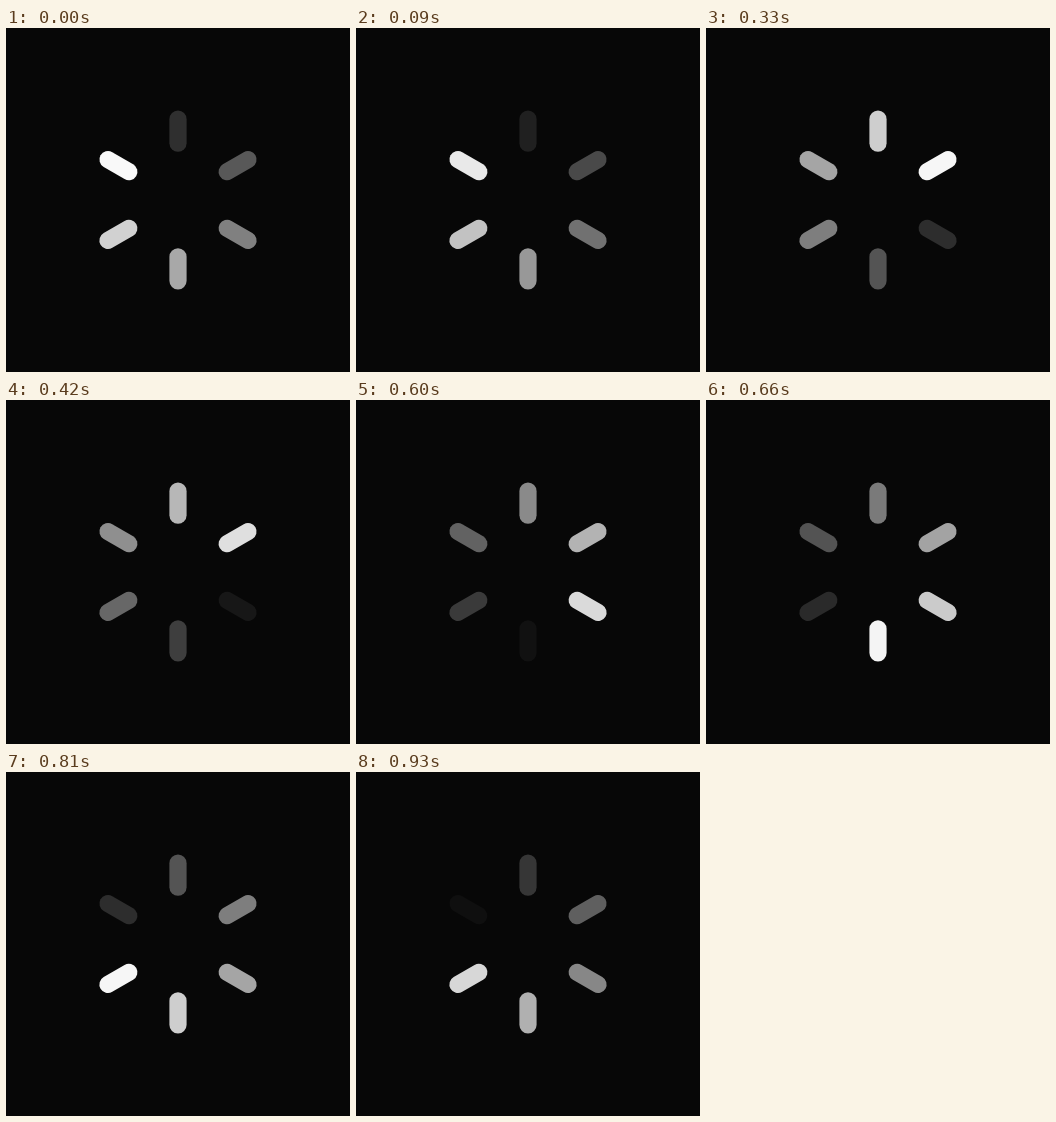
An HTML page that plays this animation: 344 px wide and 344 px high, repeating every 960 ms.

```html
<!DOCTYPE html>
<html lang="en">
<head>
<meta charset="utf-8">
<title>Spinner</title>
<style>
  html, body { margin: 0; width: 100%; height: 100%; overflow: hidden; background: #070707; }
  svg { display: block; width: 100vw; height: 100vh; }
  rect { fill: #f9f9f9; }
</style>
</head>
<body>
<svg id="spinner" viewBox="0 0 100 100"></svg>
<script>
  const LOOP = 960;
  const COUNT = 6;
  // Moments (ms) at which the picture is refreshed; it holds in between.
  const TICKS = [0, 30, 60, 120, 180, 240, 330, 420, 480, 540, 600, 660, 750, 810, 870, 930];

  const spinner = document.getElementById('spinner');
  const bars = Array.from({ length: COUNT }, (_, i) => {
    const bar = document.createElementNS('http://www.w3.org/2000/svg', 'rect');
    const attrs = {
      x: 47.5, y: 24, width: 5, height: 12, rx: 2.5,
      transform: `rotate(${i * 360 / COUNT} 50 50)`
    };
    for (const name in attrs) bar.setAttribute(name, attrs[name]);
    return spinner.appendChild(bar);
  });

  // Each bar flashes in turn, then fades linearly over a full loop.
  function draw(now) {
    const t = now % LOOP;
    const held = TICKS.filter(tick => tick <= t).pop();
    bars.forEach((bar, i) => {
      const age = (held - (i + 1) * LOOP / COUNT + LOOP) % LOOP;
      bar.setAttribute('opacity', 1 - age / LOOP);
    });
  }

  const start = performance.now();
  function frame() {
    draw(performance.now() - start);
    requestAnimationFrame(frame);
  }
  frame();
</script>
</body>
</html>
```
